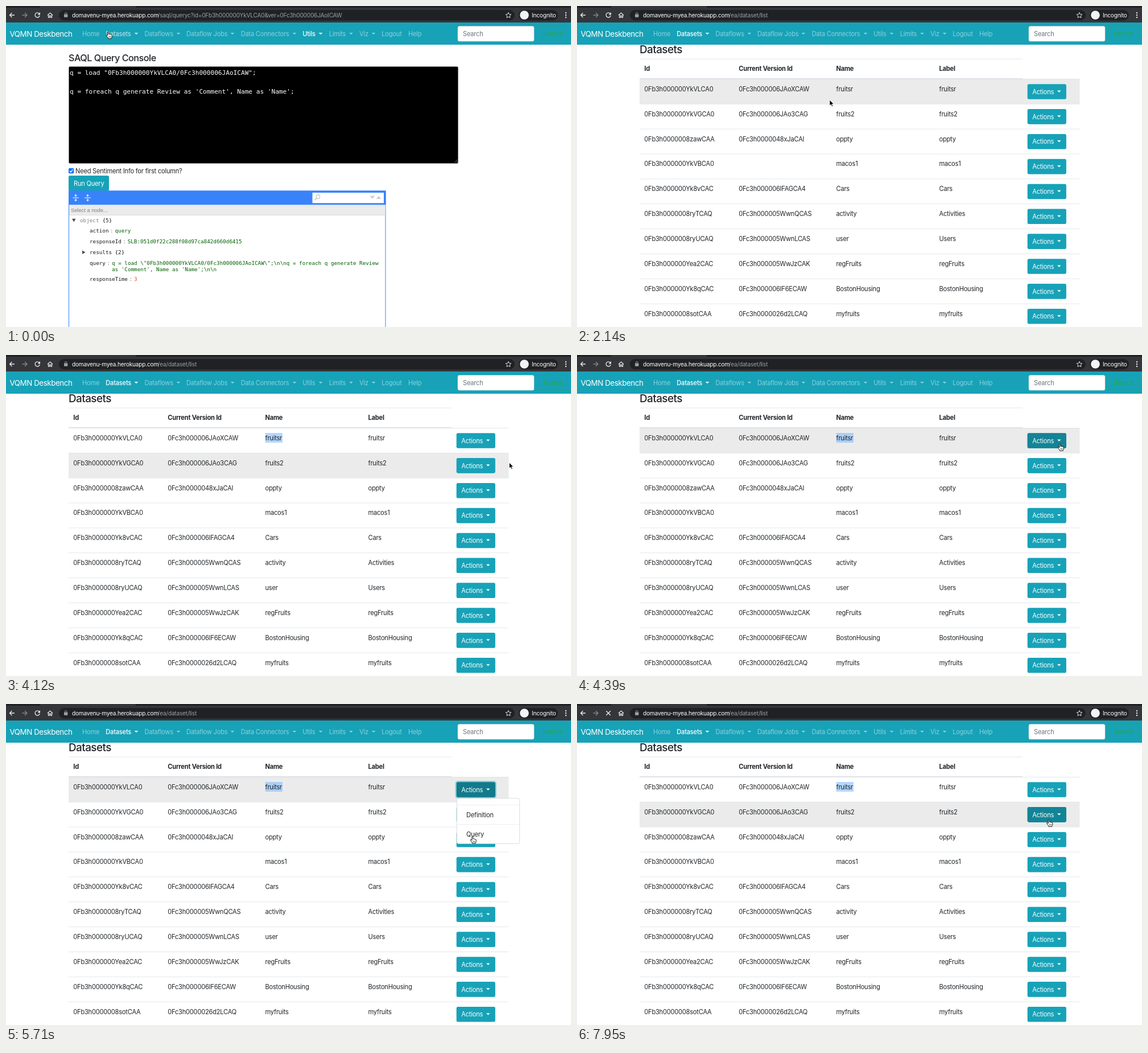
An HTML page that plays this animation: 993x564 px, repeating every 8000 ms.

```html
<!DOCTYPE html>
<html lang="en">
<head>
<meta charset="utf-8">
<title>Query console</title>
<style>
html, body { margin: 0; width: 100%; height: 100%; overflow: hidden; background: #fff; }
svg { display: block; width: 993px; height: 564px; }
text { font: 400 11.1px Inter, sans-serif; letter-spacing: -.02em; fill: #212529; }
text.bar { font-size: 10.1px; fill: #9aa0a6; }
text.white { fill: #fff; }
text.brand { font-size: 13.3px; letter-spacing: -.03em; fill: #fff; }
text.nav { fill: rgba(255,255,255,.5); }
text.h4 { font-size: 16.2px; font-weight: 500; letter-spacing: -.03em; }
text.h3 { font-size: 18.9px; font-weight: 500; letter-spacing: -.03em; }
text.th { font-weight: 700; }
text.code { font: 11.12px "DejaVu Sans Mono", monospace; letter-spacing: 0; fill: #fff; }
text.json { font: 9.28px "DejaVu Sans Mono", monospace; letter-spacing: 0; fill: #1a1a1a; }
text.str { fill: #006000; }
text.dim { fill: #808080; }
text.num { fill: #ee422e; }
text.small { font: 9.3px "Liberation Sans", Arial, sans-serif; letter-spacing: 0; fill: #808080; }
</style>
</head>
<body>
<svg id="stage" viewBox="0 0 993 564"></svg>
<script>
const LOOP = 8000;
const TEAL = '#17a2b8';

const rect = (x, y, w, h, fill, extra = '') =>
  `<rect x="${x}" y="${y}" width="${w}" height="${h}" fill="${fill}" ${extra}/>`;
const text = (x, y, s, cls = '', extra = '') =>
  `<text x="${x}" y="${y}" class="${cls}" ${extra}>${s.replace(/&/g, '&amp;')}</text>`;
const path = (d, fill, extra = '') => `<path d="${d}" fill="${fill}" ${extra}/>`;
const line = (d, color, w = 1.3, extra = '') =>
  path(d, 'none', `stroke="${color}" stroke-width="${w}" ${extra}`);
const caret = (x, y, fill = '#fff') => path(`M${x - 3.3} ${y - 1.6}h6.6l-3.3 3.3z`, fill);
const group = (id, body, extra = '') => `<g id="${id}" ${extra}>${body}</g>`;

function browserBar() {
  return rect(0, 0, 993, 29, '#35363a') +
    rect(0, 0, 60, 3, '#202124') + rect(228, 0, 765, 3, '#202124') +
    line('M15 16H6.5M10.5 12L6.5 16l4 4', '#e8eaed') +
    line('M28.5 16H37M33 12l4 4-4 4', '#85878b') +
    group('reload', line('M58.3 13.2a4.1 4.1 0 1 0 .9 3.6', '#e8eaed') + path('M60 11v4.4h-4.4z', '#e8eaed')) +
    group('stop', line('M51.3 12.2l7.6 7.6M58.9 12.2l-7.6 7.6', '#e8eaed', 1.4)) +
    line('M73 16.3l4.5-4.3 4.5 4.3M74.5 15.5v4.7h2v-3h2v3h2v-4.7', '#e8eaed', 1.2) +
    rect(93, 7, 801, 18.5, '#202124', 'rx="9.2"') +
    rect(102, 14.6, 6.4, 5.2, '#9aa0a6', 'rx=".7"') + line('M103.4 15v-1.5a1.8 1.8 0 0 1 3.6 0v1.5', '#9aa0a6', 1) +
    text(116, 19.6, 'domavenu-myea.herokuapp.com', 'bar white') +
    group('urlA', text(266.8, 19.6, '/saql/queryc?id=0Fb3h000000YkVLCA0&ver=0Fc3h000006JAoICAW', 'bar')) +
    group('urlB', text(266.8, 19.6, '/ea/dataset/list', 'bar')) +
    line('M883 11.4l1.4 3.1 3.4.4-2.5 2.3.7 3.4-3-1.7-3 1.7.7-3.4-2.5-2.3 3.4-.4z', '#dfe1e5', 1) +
    rect(901, 7, 69, 18.5, '#202124', 'rx="9.2"') +
    '<circle cx="911" cy="16" r="7.8" fill="#f1f3f4"/>' +
    text(924, 19.6, 'Incognito', 'bar white') +
    [12, 16, 20].map(y => `<circle cx="984" cy="${y}" r="1.2" fill="#e8eaed"/>`).join('');
}

function navBar() {
  const items = [['Home', 134], ['Datasets', 175.3, 229], ['Dataflows', 243.5, 303], ['Dataflow Jobs', 317, 398],
    ['Data Connectors', 412.7, 507], ['Utils', 521.3, 553], ['Limits', 567.7, 606.5], ['Viz', 621, 646],
    ['Logout', 660.3], ['Help', 707]];
  return rect(0, 29, 993, 39, TEAL) +
    text(6.5, 53.5, 'VQMN Deskbench', 'brand') +
    items.map(([s, x, c]) => group('nav' + s.replace(' ', ''),
      text(x, 53, s, 'nav') + (c ? caret(c, 48.5, 'rgba(255,255,255,.5)') : ''))).join('') +
    rect(794, 35.6, 134, 26.4, '#fff', 'rx="2.8" stroke="#ced4da" stroke-width=".6"') +
    text(803, 53, 'Search', '', 'style="fill:#6c757d"') +
    rect(934.5, 35.6, 52, 26.4, 'none', 'rx="2.8" stroke="#28a745" stroke-width=".7" opacity=".55"') +
    text(943, 53, 'Search', '', 'style="fill:#28a745"');
}

function fold(x, y) {
  return line(`M${x - 5.5} ${y}h11`, '#dcebff', 1.2) +
    path(`M${x} ${y - 6.5}l2.6 3h-1.9v2h-1.4v-2h-1.9zM${x} ${y + 6.5}l2.6-3h-1.9v-2h-1.4v2h-1.9z`, '#dcebff');
}

function jsonView() {
  const rows = [
    [130, 379.7, 'object', 'dim'], [169.5, 379.7, '{5}'],
    [147, 398.2, 'action'], [183, 398.2, ':', 'dim'], [191.5, 398.2, 'query', 'str'],
    [147, 417, 'responseId'], [205.5, 417, ':', 'dim'], [213.7, 417, 'SLB:051d0f22c288f08d97ca842d660d6415', 'str'],
    [147, 435.8, 'results'], [191.5, 435.8, '{2}'],
    [147, 454.5, 'query'], [177.5, 454.5, ':', 'dim'],
    [186, 454.5, 'q = load \\"0Fb3h000000YkVLCA0/0Fc3h000006JAoICAW\\";\\n\\nq = foreach q generate Review', 'str'],
    [186, 465.7, "as 'Comment', Name as 'Name';\\n\\n", 'str'],
    [147, 482.6, 'responseTime'], [216.8, 482.6, ':', 'dim'], [225, 482.6, '3', 'num']];
  return rect(110.5, 325, 556.5, 260, '#fff', 'stroke="#3883fa"') +
    rect(110, 324.5, 557.5, 25, '#3883fa') + fold(122.5, 337) + fold(143.5, 337) +
    rect(538.5, 328, 125.5, 18.3, '#fff') +
    '<circle cx="548.3" cy="335" r="3.3" fill="none" stroke="#c4c4c4" stroke-width="1.2"/>' +
    line('M546 337.5l-3.3 3.6', '#c4c4c4', 1.7) +
    path('M639.5 333.5h9l-4.5 5.5zM650.5 339h9l-4.5-5.5z', '#cfcfcf') +
    rect(111, 349.5, 555.5, 18, '#ebebeb') + rect(111, 367, 555.5, .7, '#d3d3d3') +
    text(114, 361.5, 'Select a node...', 'small') +
    path('M116 373.8h6.6l-3.3 5.6zM134 429.5v6.6l5.6-3.3z', '#4d4d4d') +
    rows.map(([x, y, s, c = '']) => text(x, y, s, 'json ' + c)).join('');
}

function consolePage() {
  return text(110, 96.7, 'SAQL Query Console', 'h4') +
    rect(110.5, 106.5, 684, 170, '#000', 'rx="2" stroke="#767676" stroke-width=".8"') +
    text(112, 120.5, 'q = load "0Fb3h000000YkVLCA0/0Fc3h000006JAoICAW";', 'code') +
    text(112, 153.8, "q = foreach q generate Review as 'Comment', Name as 'Name';", 'code') +
    line('M788.5 275l5-5M791.5 275l2-2', '#aaa', .7) +
    rect(110, 285, 9.2, 9.2, '#0075ff', 'rx="1.6"') + line('M112 289.7l2 2.1 3.4-4.6', '#fff', 1.4) +
    text(122, 293.7, 'Need Sentiment Info for first column?') +
    rect(110, 298, 71, 27, TEAL, 'rx="2.8"') + text(119, 315.6, 'Run Query', 'white') +
    jsonView();
}

const STEP = 43.86;
const button = fill => rect(791.7, 137.2, 68.2, 26.6, fill, 'rx="2.8"') +
  text(800.3, 154.7, 'Actions', 'white') + caret(847.3, 150);

function listPage() {
  const cols = [118.3, 284.3, 455.5, 636.5];
  const rows = `0Fb3h000000YkVLCA0,0Fc3h000006JAoXCAW,fruitsr,fruitsr
0Fb3h000000YkVGCA0,0Fc3h000006JAo3CAG,fruits2,fruits2
0Fb3h0000008zawCAA,0Fc3h0000048xJaCAI,oppty,oppty
0Fb3h000000YkVBCA0,,macos1,macos1
0Fb3h000000Yk8vCAC,0Fc3h000006IFAGCA4,Cars,Cars
0Fb3h0000008ryTCAQ,0Fc3h000005WwnQCAS,activity,Activities
0Fb3h0000008ryUCAQ,0Fc3h000005WwnLCAS,user,Users
0Fb3h000000Yea2CAC,0Fc3h000005WwJzCAK,regFruits,regFruits
0Fb3h000000Yk8qCAC,0Fc3h000006IF6ECAW,BostonHousing,BostonHousing
0Fb3h0000008sotCAA,0Fc3h0000026d2LCAQ,myfruits,myfruits`.split('\n').map(r => r.split(','));
  const cells = (list, y, cls) => list.map((s, i) => text(cols[i], y, s, cls)).join('');
  return text(110, 82.7, 'Datasets', 'h3') +
    rect(110, 92.6, 673, .8, '#dee2e6') + rect(110, 126.8, 673, 1.4, '#dee2e6') +
    cells(['Id', 'Current Version Id', 'Name', 'Label'], 114.3, 'th') +
    group('rowHover', rect(110, 128.2, 773.5, STEP, '#ebebeb')) +
    group('selection', rect(455.7, 137, 30.3, 17, 'rgba(128,188,254,.6)')) +
    rows.map((r, i) => rect(110, 128 + i * STEP, 773.5, .8, '#dee2e6') +
      cells(r, 149.8 + i * STEP, '') +
      `<g transform="translate(0 ${i * STEP})">${button(TEAL)}</g>`).join('') +
    group('hot', rect(790.6, 136.1, 70.4, 28.8, 'none', 'id="ring" rx="3.9" stroke="#8bd0db" stroke-width="2.2"') +
      button('#138496')) +
    group('actions', rect(792.3, 165.7, 110.4, 79.7, '#fff', 'rx="2.8" stroke="#d4d4d4" stroke-width=".8"') +
      rect(792.7, 177.2, 109.6, .7, '#e6e9ec') + rect(792.7, 211, 109.6, .7, '#e6e9ec') +
      text(809, 198.6, 'Definition') + text(809, 232.6, 'Query'));
}

const submenu = rect(170.3, 64.4, 111.2, 34.4, '#fff', 'rx="2.8" stroke="#d4d4d4" stroke-width=".8"') +
  text(187.5, 86, 'List');

const outline = (color, w) => `stroke="${color}" stroke-width="${w}" stroke-linejoin="round"`;
const cursors =
  group('arrow', path('M0 0V10.2l2.4-2.2 1.7 3.8 1.7-.8-1.7-3.6h3.2z', '#000', outline('#fff', .8))) +
  group('hand', path('M-2.2.6V-5a1 1 0 0 1 2 0v3.4q1.8-.6 2 .4q1.7-.5 1.9.5q1.6-.2 1.6 1V3q0 1.4-1 2.2V6.3H-1.6V5.3' +
    'Q-3.2 3-4.7 1q-.6-1.3.5-1.4q1 0 2 1.4z', '#fff', outline('#000', .9)) +
    line('M-.1 2v2.4M1.5 2v2.4M3.1 2v2.4', '#000', .6)) +
  group('beam', line('M-2.6-6Q0-6 0-4.6Q0-6 2.6-6M0-4.6V4.6M-2.6 6Q0 6 0 4.6Q0 6 2.6 6', '#222', 1));

const stage = document.getElementById('stage');
stage.innerHTML = rect(0, 0, 993, 564, '#fff') + group('pageA', consolePage()) + group('pageB', listPage()) +
  navBar() + group('submenu', submenu) + browserBar() + group('cursor', cursors);

const el = id => document.getElementById(id);
const show = (id, on) => { el(id).style.display = on ? '' : 'none'; };
const within = (t, a, b) => t >= a && t < b;
const at = (table, t) => table.findLast(step => step[0] <= t);

// time, x, y, pointer shape
const moves = [
  [0, 181, 51, 'hand'], [890, 183, 61, 'hand'], [980, 185, 75, 'hand'], [1070, 186, 82, 'hand'],
  [1430, 182, 75, 'arrow'], [1970, 255, 96, 'arrow'], [2050, 385, 143, 'arrow'], [2140, 444, 165, 'arrow'],
  [2590, 451, 160, 'arrow'], [2680, 463, 154, 'beam'], [2800, 472, 151, 'beam'],
  [2980, 470, 149, 'beam'], [3060, 469, 147, 'beam'],
  [3950, 560, 152, 'arrow'], [4040, 750, 169, 'arrow'], [4120, 884.5, 189, 'arrow'], [4210, 877, 182, 'arrow'],
  [4300, 863, 170, 'arrow'], [4390, 850, 162, 'hand'], [4470, 842, 157, 'hand'], [4560, 838.5, 154.5, 'hand'],
  [5180, 832, 181, 'hand'], [5270, 819, 223, 'hand'], [5350, 813, 241, 'hand'],
  [5530, 816, 240, 'hand'], [5620, 819, 239, 'hand'], [5710, 821, 238.5, 'hand'],
  [7330, 825, 218.5, 'hand'], [7420, 830, 199, 'hand'], [7500, 830.5, 209, 'hand']];
const hovered = [[0, -1], [2050, 0], [4120, 1], [4300, 0], [7860, 1]];

function tint(id, color, weight) {
  const [label, mark] = el(id).children;
  label.style.fill = mark.style.fill = color;
  label.style.fontWeight = weight;
}

function draw(t) {
  const onList = t >= 1880;
  show('pageA', !onList);
  show('urlA', !onList);
  show('pageB', onList);
  show('urlB', onList);
  const loading = within(t, 1340, 1880) || t >= 7950;
  show('stop', loading);
  show('reload', !loading);
  show('submenu', within(t, 500, 1340));
  tint('navUtils', onList ? '' : '#fff', onList ? 400 : 500);
  tint('navDatasets', onList ? '#fff' : t < 890 ? 'rgba(255,255,255,.75)' : '', onList ? 500 : 400);

  const row = at(hovered, t)[1];
  const shift = `translate(0 ${row * STEP})`;
  show('rowHover', row >= 0);
  el('rowHover').setAttribute('transform', shift);
  show('selection', t >= 3600);
  show('hot', t >= 4390);
  el('hot').setAttribute('transform', shift);
  const focused = within(t, 4920, 7860);
  show('ring', focused);
  el('hot').children[1].setAttribute('fill', focused ? '#117a8b' : '#138496');
  show('actions', within(t, 4830, 7860));

  const [, x, y, shape] = at(moves, t);
  el('cursor').setAttribute('transform', `translate(${x} ${y})`);
  for (const id of ['arrow', 'hand', 'beam']) show(id, id === shape);
}

const start = performance.now();
function tick() {
  draw((performance.now() - start) % LOOP);
  requestAnimationFrame(tick);
}
tick();
</script>
</body>
</html>
```
